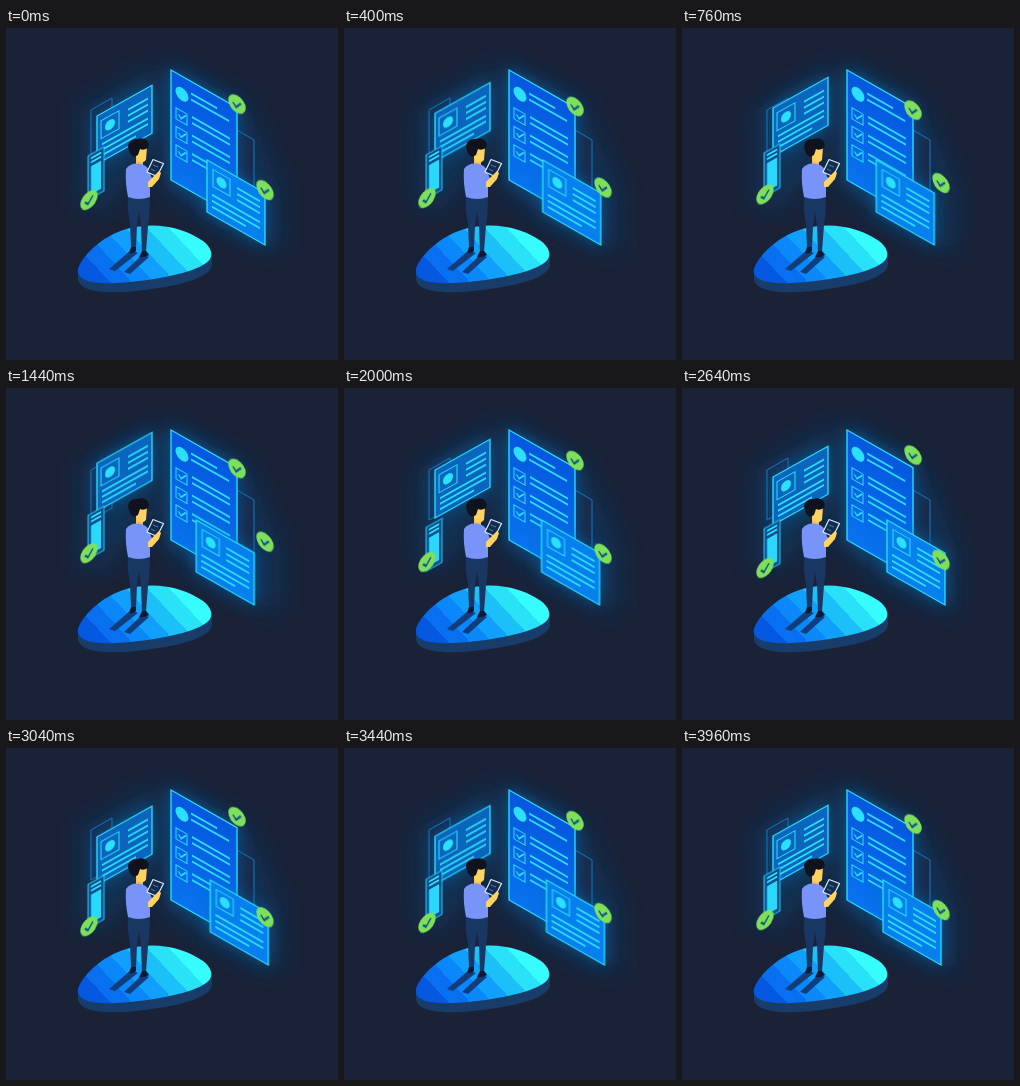
An HTML page that plays this animation: 332x332 px, repeating every 4 s.

```html
<!DOCTYPE html>
<html lang="en">
<head>
<meta charset="utf-8">
<title>Floating panels</title>
<style>
html, body { margin: 0; width: 100%; height: 100%; overflow: hidden; background: #1a2238; }
svg { display: block; width: 100%; height: 100%; }
.panel { stroke: #2be0fc; stroke-width: 1.3; }
.back { fill: #182b4c; stroke: #1578c6; stroke-width: 1; }
.line { stroke: #2be0fc; stroke-width: 2; fill: none; }
.box { fill: none; stroke: #2be0fc; stroke-width: 1; }
.mark { fill: #2be0fc; }
.tick { fill: none; stroke: #2be0fc; stroke-width: 1.4; }
.glow { filter: drop-shadow(0 0 8px rgba(0, 118, 200, .55)); }
</style>
</head>
<body>
<svg viewBox="0 0 332 332">
  <defs>
    <linearGradient id="deck" gradientUnits="userSpaceOnUse" x1="86" y1="258" x2="168" y2="182"></linearGradient>
    <linearGradient id="royal" x1="0" y1="0" x2="0" y2="1">
      <stop offset="0" stop-color="#0657de"/><stop offset="1" stop-color="#0873ee"/>
    </linearGradient>
    <filter id="soft" x="-50%" y="-50%" width="200%" height="200%"><feGaussianBlur stdDeviation="12"/></filter>
  </defs>
  <rect width="332" height="332" fill="#1a2238"/>
  <g filter="url(#soft)" fill="#07375f" opacity=".75">
    <path d="M74 80 150 36V118L100 180H74Z"/>
    <path d="M158 32 240 74 274 158V226L200 194 158 160Z"/>
  </g>

  <path d="M72 240V250C72 264 100 267 138 262C180 257 206 248 206 236V224Z" fill="#193d6b"/>
  <path d="M72 241C76 228 96 207 124 200C152 193 181 201 197 213C205 219 207 226 204 231C197 242 162 250 132 253C102 257 69 257 72 241Z" fill="url(#deck)"/>
  <path d="M125 222 132 225 109 243 103 241ZM137 226 143 229 124 246 118 244Z" fill="#123d7c"/>

  <path class="back" d="M85 82 106 70V120L85 132Z"/>
  <g id="left" class="glow"></g>
  <g id="slip"></g>
  <g id="leftBadge"></g>

  <path class="back" d="M231 102 248 112V164L231 154Z"/>
  <g id="main" class="glow"></g>
  <g id="right" class="glow"></g>
  <g id="topBadge"></g>
  <g id="lowBadge"></g>

  <g id="person">
    <path d="M122 167H144Q144 185 142 197L140 224H136L135 198 133 184 131 198 130 220H125L124 196Q121 182 122 167Z" fill="#193763"/>
    <path d="M125 219H130V223Q127 226 123 225ZM136 223H140L143 227Q138 230 133 229Z" fill="#10182f"/>
    <path d="M130 128H137V138H130Z" fill="#f5bd57"/>
    <path d="M129 119H141L140 132Q137 136 131 133Z" fill="#ffd35f"/>
    <path d="M123 122C120 116 125 110 132 111C138 108 145 114 142 120Q137 123 134 121L132 127 128 129Q124 127 123 122Z" fill="#10121d"/>
    <path d="M120 141Q124 135 132 135.500Q141 136 143 143L147 153 144 157V169Q133 173 122 169Q119 154 120 141Z" fill="#7894f8"/>
    <path d="M147 131.500 157.500 135.500 151 148.500 141 144Z" fill="#1a2a4c" stroke="#d3efff" stroke-width="1.200" stroke-linejoin="round"/>
    <path d="M147 137 152 139M145 141 149 143" stroke="#1e8ad0"/>
    <path d="M142 154 149 147 153 143 155 145 153 151 146 159 142 159Z" fill="#ffd35f"/>
  </g>
</svg>
<script>
const byId = id => document.getElementById(id);
const line = (x, y, length) => `<path class="line" d="M${x} ${y}h${length}"/>`;
const rect = (x, y, w, h, attrs) => `<rect x="${x}" y="${y}" width="${w}" height="${h}" ${attrs}/>`;
const skewed = (x, y, slope, content) => `<g transform="matrix(1 ${slope} 0 1 ${x} ${y})">${content}</g>`;
const panel = (w, h, fill) => rect(0, 0, w, h, `class="panel" fill="${fill}"`);
const emblem = (x, y, size) => rect(x, y, size, size, 'class="box"') +
  `<circle class="mark" cx="${x + size / 2}" cy="${y + size / 2}" r="5"/>`;

// Evenly banded deck
const bands = ['#0558e0', '#0870f0', '#0a88fa', '#10a0fc', '#1cc0f8', '#2ae2f8', '#36fcfe'];
byId('deck').innerHTML = bands.map((color, i) =>
  [i, i + 1].map(n => `<stop offset="${n / bands.length}" stop-color="${color}"/>`).join('')).join('');

byId('left').innerHTML = skewed(91, 88, -.56, panel(55, 48, '#0b65bd') + emblem(4, 7, 18) +
  line(31, 11, 20) + line(31, 17, 20) + line(31, 23, 20) +
  line(5, 31, 46) + line(5, 36.5, 46) + line(5, 42, 34));

byId('slip').innerHTML = skewed(82, 128, -.56,
  rect(0, 0, 16, 44, 'fill="#0e4f8e" stroke="#27c8f5"') +
  line(3, 4, 10) + line(3, 8, 10) +
  rect(3, 12, 10, 28, 'fill="#29d8fb"'));

const row = y => rect(5, y - 5, 11, 11, 'class="box"') +
  `<path class="tick" d="M7.500 ${y}l2.500 3 5-6"/>` +
  line(21, y - 5, 38) + line(21, y + 1, 38);
byId('main').innerHTML = skewed(165, 42, .57, panel(66, 110, 'url(#royal)') +
  '<circle class="mark" cx="11" cy="18" r="6.500"/>' +
  line(20, 12, 26) + line(20, 18, 38) +
  [40, 58.5, 77].map(row).join(''));

byId('right').innerHTML = skewed(201, 132, .57, panel(58, 52, '#077fec') + emblem(6, 6, 17) +
  line(30, 11, 23) + line(30, 17, 23) + line(30, 23, 23) +
  line(5, 32, 48) + line(5, 38, 48) + line(5, 44, 34));

const badge = (id, x, y, slope) => {
  byId(id).innerHTML = skewed(x, y, slope,
    '<circle r="8.700" fill="#7de05a"/>' +
    '<path d="M-4 0l3 3.500 5-6" fill="none" stroke="#0f4d8c" stroke-width="1.800"/>');
};
badge('leftBadge', 83, 172, -.56);
badge('topBadge', 231, 76, .5);
badge('lowBadge', 259, 162, .57);

// Each step: time in ms, offset in px
const loop = 4000;
const drift = (id, axis, steps) => byId(id).animate(
  steps.map(([time, shift]) => ({
    offset: time / loop,
    transform: `translate${axis}(${shift}px)`,
    easing: 'cubic-bezier(.37, 0, .63, 1)'
  })), { duration: loop, iterations: Infinity });

drift('left', 'Y', [[0, 0], [1333, -13], [2667, 1], [4000, 0]]);
drift('slip', 'Y', [[0, 0], [1100, -4], [2300, 14], [4000, 0]]);
drift('leftBadge', 'Y', [[0, 0], [1200, -8], [2600, 8], [4000, 0]]);
drift('right', 'X', [[0, 0], [1333, -11], [2667, 4], [4000, 0]]);
drift('topBadge', 'Y', [[0, 0], [1000, 7], [2667, -9], [4000, 0]]);
drift('lowBadge', 'Y', [[0, 0], [1200, -10], [2500, 10], [4000, 0]]);
</script>
</body>
</html>
```
